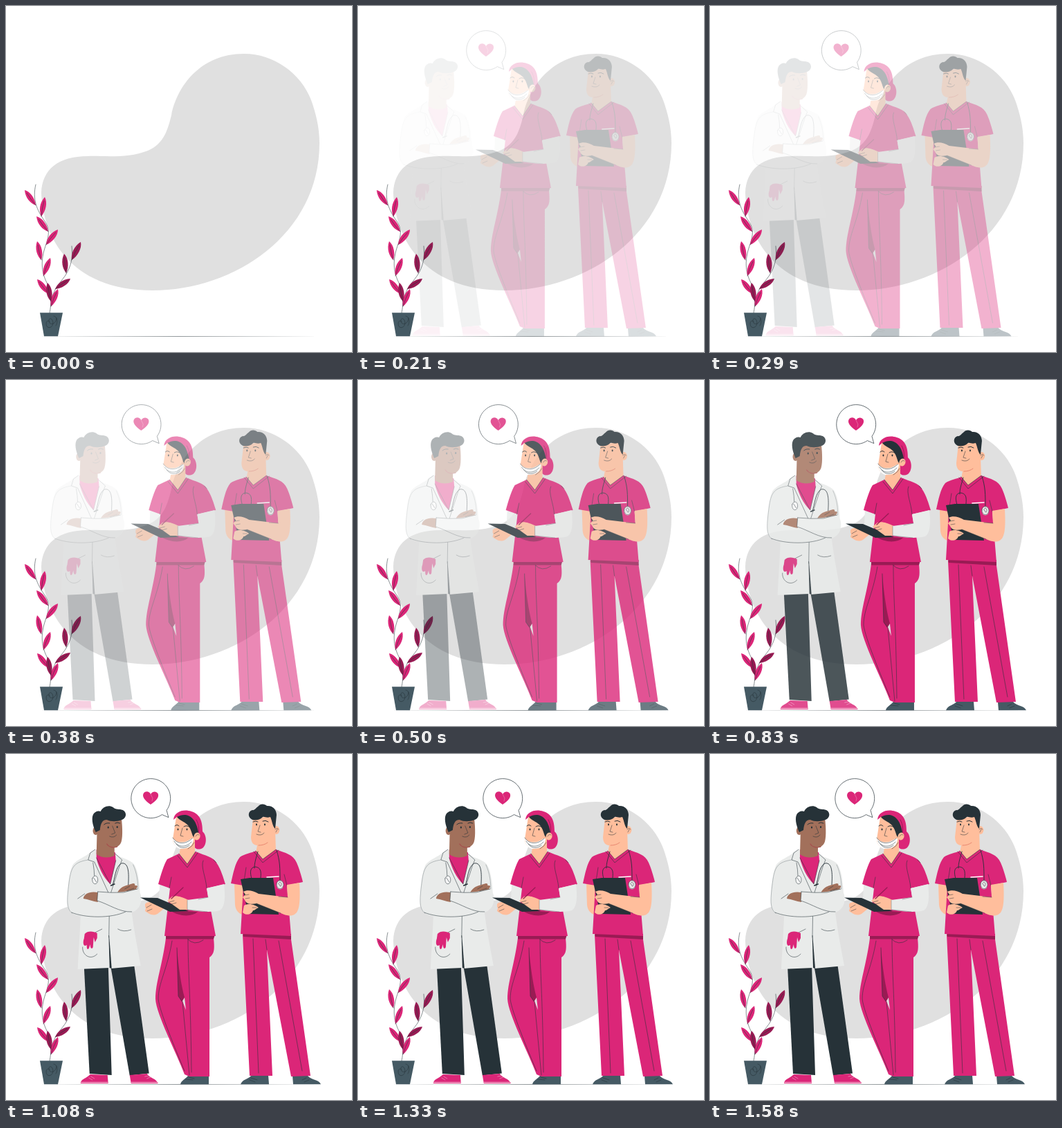
Animation of 500 by 500 pixels, one loop 1.62 s. Source, as an HTML page with a canvas:

```html
<!DOCTYPE html>
<html lang="en">
<head>
<meta charset="utf-8">
<title>Medical team</title>
<style>
  html, body { margin: 0; width: 100%; height: 100%; overflow: hidden; background: #fff; }
  canvas { display: block; width: 100vmin; height: 100vmin; }
</style>
</head>
<body>
<canvas id="stage"></canvas>
<script>
const SIZE = 500, LOOP = 1620, SLIDE = 30;
const PINK = '#db2678', WINE = '#991b54', INK = '#263238', SLATE = '#455a64';
const COAT = '#e9ebea', SKIN = '#ffbe9c', BROWN = '#a2705b', GREY = '#e0e0e0';

const scale = Math.max(1, window.devicePixelRatio || 1);
const stage = document.getElementById('stage');
const layer = document.createElement('canvas');
stage.width = stage.height = layer.width = layer.height = SIZE * scale;
const main = stage.getContext('2d');
const group = layer.getContext('2d');
let pen = main;

function fill(color, d) {
  pen.fillStyle = color;
  pen.fill(new Path2D(d));
}

function line(d, color = INK, width = 0.55) {
  pen.strokeStyle = color;
  pen.lineWidth = width;
  pen.lineCap = pen.lineJoin = 'round';
  pen.stroke(new Path2D(d));
}

function oval(color, x, y, rx, ry = rx, turn = 0) {
  pen.fillStyle = color;
  pen.beginPath();
  pen.ellipse(x, y, rx, ry, turn, 0, Math.PI * 2);
  pen.fill();
}

function leaf(color, x, y, tipX, tipY) {
  const length = Math.hypot(tipX - x, tipY - y);
  pen.save();
  pen.translate(x, y);
  pen.rotate(Math.atan2(tipY - y, tipX - x));
  pen.scale(length, length);
  fill(color, 'M0 0C.25 -.17 .65 -.22 1 0C.75 .2 .3 .18 0 0Z');
  line('M0 0Q.45 -.04 .8 0', INK, 0.5 / length);
  pen.restore();
}

function drawBackdrop() {
  fill(GREY, 'M51 270C52 236 76 217 118 217C140 216 175 221 205 209C229 199 234 177 239 158' +
    'C247 116 281 69 344 69C387 69 426 97 441 136C447 153 453 174 453 198' +
    'C453 330 330 411 212 411C90 411 53 330 51 270Z');
}

function drawPlant() {
  line('M63 444C66 428 66 415 59 400C50 382 51 366 56 350C61 335 65 324 56 311C44 294 38 279 43 258');
  line('M65 433C66 410 78 401 86 389C94 376 97 364 95 347');
  leaf(PINK, 43, 288, 27, 266);
  leaf(PINK, 51, 304, 56, 276);
  leaf(PINK, 61, 326, 44, 304);
  leaf(PINK, 58, 345, 75, 323);
  leaf(PINK, 51, 367, 45, 340);
  leaf(PINK, 54, 390, 64, 364);
  leaf(PINK, 62, 416, 45, 395);
  leaf(PINK, 65, 434, 75, 409);
  leaf(WINE, 87, 386, 84, 358);
  leaf(WINE, 95, 367, 108, 341);
  leaf(WINE, 71, 409, 93, 394);
  leaf(WINE, 65, 427, 60, 400);
  fill(SLATE, 'M49 443.3H82L75 477.3H55Z');
  line('M63 456C59 452 56 460 60 464C65 467 70 460 67 454C64 449 60 453 63 458C67 462 73 457 73 451M69 448C75 449 75 458 72 462');
}

function drawGround() {
  fill(INK, 'M45 477.500L250 477.200L454 477.500L250 477.800Z');
}

function drawDoctor() {
  // trousers and shoes
  fill(INK, 'M112 306L147 304L152 464L120 462Z');
  fill(INK, 'M150 304L184 302L206 461.500L178 464.500Z');
  fill(PINK, 'M121 463L146 464L147 476H107C107 470 115 469 121 463Z');
  fill(PINK, 'M178 464L203 462C206 468 217 469 219 476H180Z');
  line('M107.500 474.500H146.500M180.500 474.500H218.500', '#f6bad4', 1);
  line('M122 466L127 469M119 468L124 471M200 466L205 465M203 469L208 467', '#f6bad4');

  // coat over a pink shirt
  fill(COAT, 'M129 138L121 142C116 148 99 153 95 162C89 177 87 209 88 219C90 230 98 233 107 234' +
    'C106 264 104 287 103 311L149 309L151 310L194 306C189 279 184 254 181 229' +
    'C194 225 197 209 193 201C192 180 189 163 182 157C174 151 164 150 157 144Z');
  fill(PINK, 'M130 138L157 142L158 154L150 188C140 179 133 163 130 151Z');
  line('M128 138L121 143L118 153L127 156L147 200M130 150L150 188L158 154M157 144L167 153L164 160L151 200');
  line('M118 153C99 156 94 162 91 181C87 210 86 224 95 230M183 160C189 173 190 186 190 195', '#7d8588', 0.5);
  line('M148.500 233L148 265');
  fill(INK, 'M147.700 262L148.300 262L152 310L149 309Z');
  line('M161 253Q169 258 180 254M110 279C109 291 122 299 131 289M128 258L138 253');
  fill(PINK, 'M113 260C117 255 126 256 131 259L131 266L128 272L126 265L125 279C124 282 121 282 121 275' +
    'L119 281C116 284 116 279 116 276C111 280 110 272 112 267Z');
  line('M125 157Q127 168 127 176');
  oval('#f5f5f5', 128, 182, 4.5, 6);
  line('M124 180C126 174 132 175 132 182C132 190 123 190 124 180M126 179L130 185');
  line('M153 190C157 180 157 163 166 158C177 156 177 173 176 189', INK, 0.9);
  line('M151 190L156 188', INK, 1.8);

  // head
  oval(BROWN, 129, 111, 4.2, 6);
  fill(BROWN, 'M131 105L135 94L166 92C168 108 168 124 165 129C162 134 158 135 156 135L156 147Q142 153 130 145Z');
  line('M145 130C148 135 155 136 160 134', '#a64f4e', 1.2);
  fill(INK, 'M129 113C126 107 122 95 125 88C128 82 134 82 136 83C139 76 148 73 154 77' +
    'C158 81 163 79 168 81C174 84 174 92 167 95C159 98 151 98 145 95C138 95 136 101 135 110Z');
  oval(INK, 147, 106, 1.1, 1.5);
  oval(INK, 160, 105.5, 1.1, 1.5);
  line('M141 102Q144 99 149 100M157 100Q160 98 164 100', INK, 1);
  line('M153 104L157 114L152 116M149 119Q155 122 159 117');

  // crossed arms
  fill(COAT, 'M91 199C87 217 90 231 104 233C130 238 161 235 175 226L168 205L113 207Z');
  line('M94 229C113 237 151 238 172 228M103 209L113 202');
  fill(BROWN, 'M111 209C112 202 120 198 132 200L132 214C125 213 118 210 111 209Z');
  fill(BROWN, 'M160 201C163 194 169 191 173 190L183 187C188 187 183 191 188 190C192 192 184 196 189 195C192 199 181 202 174 203Z');
  fill(COAT, 'M132 199Q151 201 169 199L190 195C197 207 196 225 181 228C165 230 149 217 131 212Z');
  line('M132 199L131 212C148 217 163 229 181 228M132 199Q152 201 169 200L189 195');
  line('M171 195L178 191M174 198L184 194', INK, 0.5);
}

function drawNurse() {
  // trousers and shoes
  fill(SLATE, 'M252 477.300C253 472 259 470 263 465H293V477.300Z');
  fill(PINK, 'M231 266H300C302 285 300 289 294 294L294 466H265L258 463' +
    'C246 431 217 376 216 354C216 330 226 305 231 266Z');
  fill(WINE, 'M247 280C249 306 253 334 258 352L254 358L249 350Z');
  fill(GREY, 'M255 357L258 352L260 370Z');
  line('M263 267C263 316 267 352 268 460M240 270C233 312 220 331 220 354C222 372 245 427 258 458M247 280L249 350L255 358L265 464M262 267Q272 278 285 269');
  fill(WINE, 'M231 262L302 261L300 267.500H231Z');
  line('M259 470L270 471M264 467L272 469');

  // head and mask
  fill(PINK, 'M242 95C243 83 257 79 268 83C281 87 284 98 284 112C291 118 290 132 284 136' +
    'C277 140 270 136 272 129L274 112C266 101 257 91 247 91Z');
  line('M275 95C279 102 280 112 276 119', WINE, 1);
  fill(SKIN, 'M246 91C258 91 270 100 273 115L273 145L262 160L250 147L252 136C246 136 241 130 241 123Z');
  fill(INK, 'M247 91C260 84 274 89 278 113L273 121C268 120 270 112 263 103C257 97 251 96 247 91Z');
  oval(SKIN, 276, 119, 4.5, 5.5, 0.3);
  line('M274 119Q276 115 279 117M263 137Q270 133 272 128', INK, 0.5);
  oval(INK, 248.5, 109, 1, 1.4);
  oval(INK, 261.5, 109, 1, 1.4);
  line('M244 104Q247 101 250 104M257 105Q261 102 266 106', INK, 1);
  line('M255 107L252 118L256 119');
  fill('#fff', 'M241 121C247 130 260 129 268 122L271 122C271 132 264 137 254 137C246 137 241 131 241 121Z');
  line('M241 121C247 131 260 131 269 122M243 126C249 136 261 135 268 127M246 130C252 138 260 136 265 132');

  // tunic and arms
  fill(COAT, 'M222 188L237 193L237 214H221Z');
  fill(PINK, 'M250 144L262 159L274 141C288 147 300 149 304 157C311 167 314 179 317 188L290 194' +
    'L303 263H229L237 194L220 188C224 174 228 160 233 152Z');
  line('M250 144L262 159L274 141M248 147L262 164L277 143M304 157L300 153M285 154C281 163 289 178 290 194M236 194L239 178');
  fill(WINE, 'M237 226L277 228C268 236 250 235 237 226Z');
  fill(SKIN, 'M201 217C203 213 209 214 213 214L230 222L219 231C211 235 206 230 202 228C199 225 204 224 201 221Z');
  line('M203 222L210 218M204 227L211 224', INK, 0.5);
  fill(INK, 'M194 207.500L219 208L264 227L237 228Z');
  fill(SKIN, 'M233 212L240 206C247 204 252 206 264 211L264 225L251 225Z');
  line('M239 209L256 193', WINE, 1.2);
  line('M236 214L243 212M239 217L246 215', INK, 0.5);
  fill(COAT, 'M290 194L315 188C317 205 317 221 309 226C294 230 276 227 262 225L262 211L292 207Z');
  line('M262 211V225L291 228M278 210L292 207', '#657075', 0.5);
}

function drawColleague() {
  // trousers and shoes
  fill(SLATE, 'M339 477.300C342 469 350 471 355 464H379L380 477.300Z');
  fill(SLATE, 'M415 477.300L414 465H436C442 472 452 470 455 477.300Z');
  fill(PINK, 'M342 261H411L440 465L412 466L377 283L385 465L352 465Z');
  fill(WINE, 'M342 259L412 260L412 268L343 264Z');
  line('M357 267L365 461M377 283L375 268M394 270L428 458');
  line('M354 468L363 471M352 471L360 474M434 468L428 471M438 471L431 474');

  // head
  fill(SKIN, 'M357 93L384 90L389 109L390 140L372 153L361 143L363 132C357 132 354 127 354 120Z');
  oval(SKIN, 390.5, 110, 4.8, 6);
  line('M365 132Q373 132 378 128', '#e98871', 1);
  line('M389 109Q392 106 394 109M390 113L392 109', INK, 0.5);
  fill(INK, 'M356 95C349 92 349 83 356 81C359 82 361 78 364 76C368 71 374 72 377 75' +
    'C385 74 391 80 391 88L389 108C385 104 385 98 382 91C376 93 374 90 371 91C366 96 361 96 356 95Z');
  oval(INK, 362, 102, 1, 1.4);
  oval(INK, 374, 102, 1, 1.4);
  line('M357 98Q361 96 364 98M371 97Q375 95 379 98', INK, 1);
  line('M367 103L364 112L368 113M362 116Q369 119 373 114');

  // tunic
  fill(SKIN, 'M330 188L346 188L347 224L351 232C341 235 332 229 331 218Z');
  fill(PINK, 'M361 140L371 152L390 138C404 143 415 145 420 157C424 166 427 177 429 185L406 190' +
    'L412 263L339 260L343 190L325 187C328 174 331 157 338 149C345 144 355 143 361 140Z');
  line('M361 140L371 152L390 138M358 141L371 157L394 139M347 164L343 190M406 190L402 174');
  line('M364 141C361 152 359 157 359 165M355 180C352 170 353 164 360 163C368 164 369 169 368 179M391 139C396 155 396 164 396 184', INK, 0.9);
  line('M377 178L394 177', '#fff', 1.6);
  oval('#e8e8e8', 396, 189, 5.2, 6.5);
  line('M391 188C391 181 400 181 401 188C401 197 391 197 391 188M394 187C396 182 400 188 397 191Z');

  // clipboard and arms
  fill(INK, 'M339 181L352 179L386 179L394 232L350 231Z');
  fill(SKIN, 'M406 189L424 186C425 202 425 218 422 225C419 234 411 235 402 232L362 216' +
    'C352 218 347 216 345 211L342 207L346 203L343 199C348 196 357 197 365 202L407 207Z');
  fill(SKIN, 'M344 219C351 215 360 218 365 222C360 224 360 226 357 226C355 232 347 234 342 229Z');
  line('M345 204L351 203M346 209L352 208M362 216L397 230M394 206L407 207M356 222L362 222', INK, 0.5);
}

function drawBubble() {
  const outline = 'M232.300 81A28.500 28.500 0 1 0 225.500 87.600L234.500 91.500Z';
  fill('#fff', outline);
  line(outline, INK, 0.7);
  fill(PINK, 'M209 73C200 67 196 61 199 56.500C202 53 207 54 209 58C212 53.500 217 53.500 219.500 57C222 62 217 68 209 73Z');
  line('M209 58L212 64L211 68', '#f49ac1', 0.5);
}

// cubic-bezier(.36, -.01, .5, 1.38)
function ease(x) {
  if (x <= 0) return 0;
  if (x >= 1) return 1;
  const curve = (t, a, b) => 3 * (1 - t) * t * ((1 - t) * a + t * b) + t ** 3;
  let low = 0, high = 1;
  for (let i = 0; i < 24; i++) {
    const mid = (low + high) / 2;
    if (curve(mid, 0.36, 0.5) < x) low = mid; else high = mid;
  }
  return curve(low, -0.01, 1.38);
}

function slideIn(progress, ...parts) {
  group.setTransform(scale, 0, 0, scale, 0, 0);
  group.clearRect(0, 0, SIZE, SIZE);
  group.translate((progress - 1) * SLIDE, 0);
  pen = group;
  parts.forEach(draw => draw());
  pen = main;
  main.globalAlpha = Math.min(1, Math.max(0, progress));
  main.drawImage(layer, 0, 0, SIZE, SIZE);
  main.globalAlpha = 1;
}

function render(time) {
  main.setTransform(scale, 0, 0, scale, 0, 0);
  main.fillStyle = '#fff';
  main.fillRect(0, 0, SIZE, SIZE);
  drawBackdrop();
  drawGround();
  drawPlant();
  slideIn(ease((time - 15) / 1500), drawDoctor);
  slideIn(ease((time + 22) / 1000), drawColleague, drawNurse, drawBubble);
}

const start = performance.now();
function tick() {
  render((performance.now() - start) % LOOP);
  requestAnimationFrame(tick);
}
tick();
</script>
</body>
</html>
```
